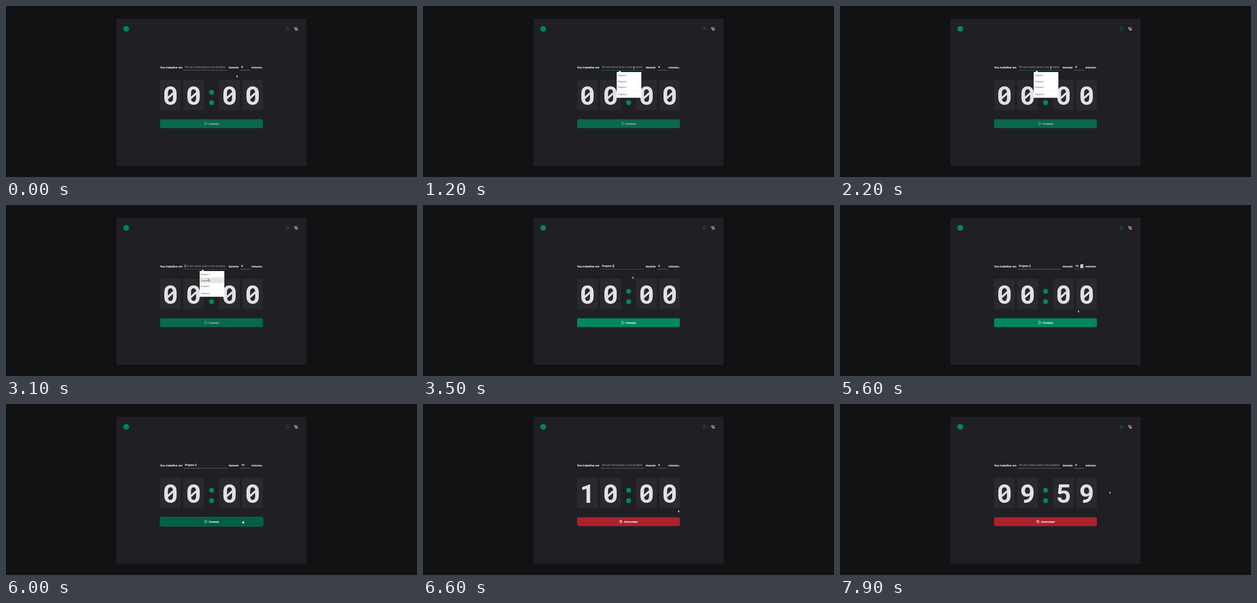
Animation, 800 px wide and 334 px high, one loop 8000 ms. Source, as an HTML page:

```html
<!DOCTYPE html>
<html lang="pt-BR">
<head>
<meta charset="utf-8">
<title>Timer</title>
<style>
  html, body { margin: 0; height: 100%; overflow: hidden; background: #121214; }
  svg { display: block; width: 100vw; height: 100vh; }
  text { font: 700 5.63px Roboto, sans-serif; fill: #fff; }
  #digits text { font-size: 50px; fill: #e1e1e6; text-anchor: middle; }
  #digits path { stroke: #e1e1e6; stroke-width: 4; }
  #button text { font-size: 5px; }
  #menu text { font-size: 4.1px; font-weight: 400; fill: #333; }
  .icon { fill: none; stroke: #e1e1e6; stroke-width: .65; stroke-linejoin: round; stroke-linecap: round; }
  .cursor { fill: #fff; stroke: #111; stroke-width: .5; stroke-linejoin: round; }
</style>
</head>
<body>
<svg viewBox="0 0 800 334">
  <rect x="215" y="25" width="370" height="287.3" rx="2.5" fill="#202024"/>
  <circle cx="234" cy="44.5" r="5.5" fill="#00875f"/>
  <g class="icon" style="stroke:#00875f">
    <circle cx="547.4" cy="44.9" r="2.8"/>
    <path d="M546.5 40.9h1.8M547.4 44.9l1.2-1.2"/>
  </g>
  <path class="icon" d="M563 46v-3a1 1 0 0 0-2 0q0 .8 .7 .8H563M562 42h4q1 0 1 1v3M564.3 43.8h1.5M564.3 45.2h1.5M563.6 46.2h4.2q.4 1.4-1 1.4h-2.6q-1.2 0-1.2-1.6"/>

  <text x="300" y="121.5">Vou trabalhar em</text>
  <text x="348.3" y="121.2" id="project"></text>
  <text x="433.5" y="121.5">durante</text>
  <text x="457.9" y="121.2" id="minutes"></text>
  <text x="477.8" y="121.5">minutos.</text>
  <rect id="projectLine" x="346" y="125.1" width="85" height=".7"/>
  <rect id="minutesLine" x="455.7" y="125.1" width="19.7" height=".7"/>
  <rect id="caret" y="116" width=".6" height="7" fill="#fff"/>
  <g id="spinner">
    <rect x="468" y="116" width="5.5" height="7" fill="#eee"/>
    <path d="M469.3 118.7l1.4-1.5 1.4 1.5zM469.3 120.5l1.4 1.5 1.4-1.5z" fill="#444"/>
  </g>

  <g id="digits"></g>
  <g fill="#00875f"><circle cx="400.2" cy="168.6" r="4.9"/><circle cx="400.2" cy="188.8" r="4.9"/></g>

  <g id="button">
    <rect id="face" x="300" y="221.2" width="200" height="17.4" rx="2.5"/>
    <g id="start">
      <path class="icon" style="stroke:#fff" d="M387.2 227v5.8l4.8-2.9z"/>
      <text x="394.6" y="231.7">Começar</text>
    </g>
    <g id="stop">
      <path class="icon" style="stroke:#fff" d="M383 230v-2.2q.6-.8 1.1 0v-.7q.6-.8 1.2 0v.7q.6-.7 1.1 0v1.6q.7-.7 1.2 0v1q0 2.4-2.3 2.4T383 230.6zM384.1 227.8v1.6M385.3 227.8v1.6M386.4 229.4q-1 .3-.8 1.5"/>
      <text x="391.6" y="231.7">Interromper</text>
    </g>
  </g>

  <g id="menu">
    <path d="M377 129h3.3l2.7-3 2.7 3H425v50.2H377z" fill="#fff"/>
    <rect id="option" x="377" y="141.5" width="48" height="11.2" fill="#e6e6e6"/>
    <path d="M377 165.2h48" stroke="#ddd" stroke-width=".5"/>
    <text x="380" y="137.2">Projeto 1</text>
    <text x="380" y="148.5">Projeto 2</text>
    <text x="380" y="159.7">Projeto 3</text>
    <text x="380" y="173.7">Projeto 4</text>
  </g>

  <g id="cursor">
    <path id="arrow" class="cursor" d="M0 0v5l1.1-1 .8 1.8 .9-.4-.8-1.7h1.5z"/>
    <path id="beam" d="M-1-2.5h2M0-2.5v5M-1 2.5h2" stroke="#ddd" stroke-width=".6"/>
    <path id="hand" class="cursor" d="M-.6-2q.6-.8 1.2 0v2l2 .5q.5.2.4 1L2.4 4H-.6L-2 1.6q.2-.9 1.4 0z"/>
  </g>
</svg>
<script>
const LOOP = 8000, GREEN = '#00875f', GREY = '#7c7c8a';
const el = id => document.getElementById(id);
const show = (id, on) => el(id).setAttribute('visibility', on ? 'inherit' : 'hidden');
const fill = (id, color) => el(id).setAttribute('fill', color);
const within = (v, a, b) => v >= a && v < b;

const columns = [320, 365, 435, 480];
el('digits').innerHTML = columns.map((x, i) => `
  <rect x="${x - 20}" y="144" width="40" height="59.4" rx="2.5" fill="#29292e"/>
  <text id="digit${i}" x="${x}" y="193"></text>
  <path id="slash${i}" d="M${x - 5.5} 180.2l11-10"/>`).join('');

// time, x, y of the pointer
const path = [
  [0, 448.6, 134.4], [500, 410.3, 121.5], [2500, 410.3, 121.5], [3100, 393.6, 143.7],
  [3300, 393.6, 143.7], [4400, 470.6, 118.6], [4900, 470.6, 118.6], [5800, 461, 229.6],
  [6100, 461, 229.6], [6600, 496.5, 206.6], [7700, 496.5, 206.6], [7900, 524.3, 170.3], [LOOP, 524.3, 170.3]
];

function pointer(t) {
  const i = path.findIndex(p => p[0] > t);
  const [t0, x0, y0] = path[i - 1], [t1, x1, y1] = path[i];
  const k = (t - t0) / (t1 - t0);
  return [x0 + (x1 - x0) * k, y0 + (y1 - y0) * k];
}

function draw(time) {
  const t = Math.floor(time % LOOP / 100) * 100;
  const [x, y] = pointer(t);
  const chosen = within(t, 3300, 6100), running = t >= 6100;
  const open = within(t, 600, 3300);
  const inProject = within(t, 600, 4700), inMinutes = within(t, 4700, 5800);

  el('project').textContent = chosen ? 'Projeto 2' : 'Dê um nome para o seu projeto';
  el('project').style.fill = chosen ? '#fff' : GREY;
  el('minutes').textContent = running || t < 4700 ? 0 : t < 4800 ? 5 : 10;
  fill('projectLine', inProject ? GREEN : GREY);
  fill('minutesLine', inMinutes ? GREEN : GREY);

  const blink = chosen ? !within(t, 3800, 4300) : !within(t, 1200, 1700) && !within(t, 2200, 2700);
  show('caret', inProject && blink);
  el('caret').setAttribute('x', chosen ? 371.5 : 348.2);

  const overRow = within(y, 114, 127);
  show('spinner', inMinutes || overRow && within(x, 455, 477));
  show('menu', open);
  show('option', open && within(y, 141.5, 152.7));

  const clock = !running ? '0000' : t < 7100 ? '1000' : '0959';
  [...clock].forEach((d, i) => {
    el('digit' + i).textContent = d;
    show('slash' + i, d === '0');
  });

  const hover = within(x, 300, 500) && within(y, 221, 239);
  fill('face', running ? (hover ? '#7a1921' : '#ab222e') : hover ? '#015f43' : GREEN);
  el('face').setAttribute('stroke', within(t, 5800, 6100) ? GREEN : 'none');
  el('button').setAttribute('opacity', chosen || running ? 1 : .7);
  show('start', !running);
  show('stop', running);

  const beam = overRow && (within(x, 346, 431) || within(x, 456, 467));
  el('cursor').setAttribute('transform', `translate(${x} ${y})`);
  show('beam', beam);
  show('hand', hover);
  show('arrow', !beam && !hover);
}

const begin = performance.now();
function tick() {
  draw(performance.now() - begin);
  requestAnimationFrame(tick);
}
tick();
</script>
</body>
</html>
```
